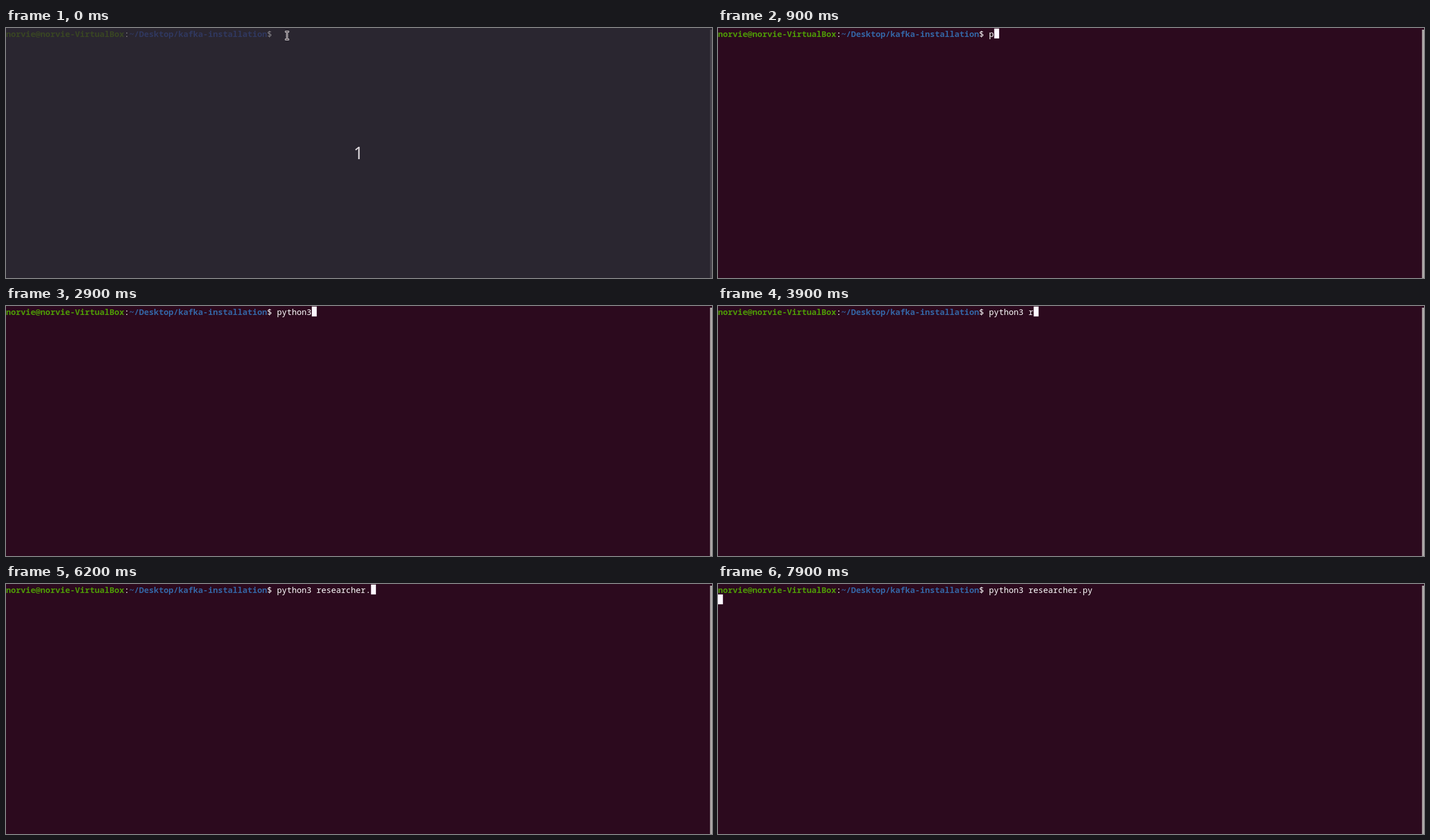
Animation, 1256 px wide and 446 px high, one loop 8 s. Source, as an HTML page:

```html
<!DOCTYPE html>
<html lang="en">
<head>
<meta charset="utf-8">
<title>Terminal session</title>
<style>
  html, body { margin: 0; width: 100%; height: 100%; overflow: hidden; background: #2c0a1e; }
  svg { display: block; width: 1256px; height: 446px; }
  text { white-space: pre; }
  .line { font: 14.625px "Noto Sans Mono", "DejaVu Sans Mono", monospace; fill: #fff; }
  .user, .path { font-weight: 700; }
  .user { fill: #4e9a06; }
  .path { fill: #3465a4; }
  .count { font: 30px "Noto Sans", sans-serif; fill: #ddd8dc; text-anchor: middle; }
  .bar { fill: #aeaaa9; }
  .dim .line { fill: #89868c; }
  .dim .user { fill: #394623; }
  .dim .path { fill: #30385f; }
  .dim .bar { fill: #48454c; }
</style>
</head>
<body>
<svg id="stage" viewBox="0 0 1256 446">
  <rect id="screen" width="1256" height="446"/>
  <rect class="bar" x="1252.5" y="3" width="3.5" height="443"/>
  <text class="line" y="15.5"><tspan class="user">norvie@norvie-VirtualBox</tspan>:<tspan class="path">~/Desktop/kafka-installation</tspan>$ <tspan id="typed"></tspan></text>
  <rect id="cursor" width="8.775" height="17.6" fill="#fdf6ff"/>
  <g id="pointer" fill="none">
    <path d="M496.5 6.5H503.5M496.5 20.5H503.5M500 6.5V20.5" stroke="#fff" stroke-width="3"/>
    <path d="M497 6.5H503M497 20.5H503M500 6.5V20.5" stroke="#180812"/>
  </g>
  <text id="count" class="count" x="627" y="234">1</text>
</svg>
<script>
const LOOP = 8000, CELL = 8.775, ROW = 17.6, PROMPT_LENGTH = 55;
const COMMAND = "python3 researcher.py";
const START = 200, ENTER = 7900;

// [time, number of characters typed]
const KEYS = [
  [900, 1], [2300, 2], [2500, 6], [2900, 7], [3300, 8], [3900, 9], [4000, 10],
  [4300, 11], [4600, 12], [4700, 13], [4900, 14], [5100, 15], [5400, 16],
  [5500, 17], [5700, 18], [6200, 19], [6600, 20], [6900, 21]
];
const BLINKS = [[700, 900], [7400, 7700]];

const [stage, screen, typed, cursor, pointer, count] =
  ["stage", "screen", "typed", "cursor", "pointer", "count"].map(id => document.getElementById(id));

const show = (node, visible) => node.setAttribute("visibility", visible ? "visible" : "hidden");

function render(t) {
  const counting = t < START;
  const entered = t >= ENTER;
  const length = KEYS.reduce((n, [time, chars]) => t >= time ? chars : n, 0);
  const blinkedOff = BLINKS.some(([from, to]) => t >= from && t < to);

  stage.classList.toggle("dim", counting);
  screen.setAttribute("fill", counting ? "#2a2630" : "#2c0a1e");
  typed.textContent = COMMAND.slice(0, length);
  cursor.setAttribute("x", entered ? 0 : (PROMPT_LENGTH + length) * CELL);
  cursor.setAttribute("y", entered ? 1 + ROW : 1);
  show(cursor, !counting && !blinkedOff);
  show(pointer, t < KEYS[0][0]);
  show(count, counting);
}

const origin = performance.now();
function tick() {
  render((performance.now() - origin) % LOOP);
  requestAnimationFrame(tick);
}
tick();
</script>
</body>
</html>
```
